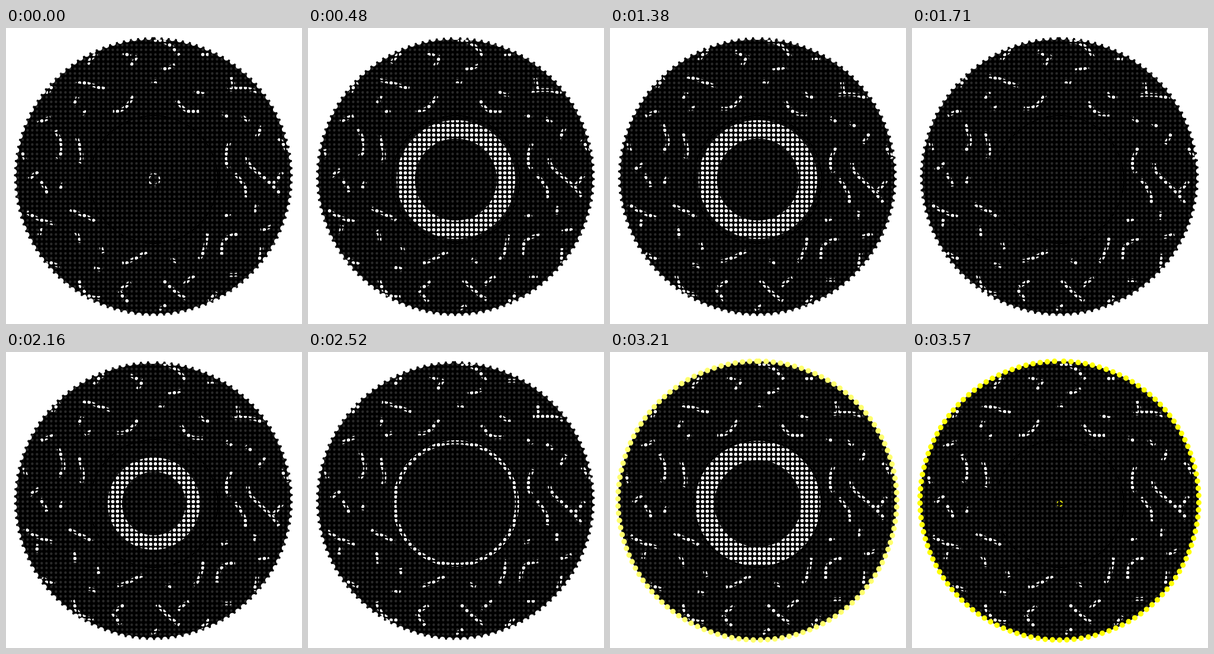
These frames come from a looping animation (500x500 px, 3600 ms). An HTML page with a canvas:

```html
<!DOCTYPE html>
<html lang="en">
<head>
<meta charset="utf-8">
<title>Halftone disc</title>
<style>
  html, body { margin: 0; width: 100%; height: 100%; overflow: hidden; background: #fff; }
  canvas { display: block; width: 500px; height: 500px; }
</style>
</head>
<body>
<canvas id="stage" width="500" height="500"></canvas>
<script>
const LOOP = 3600, SIZE = 500, TAU = Math.PI * 2;
const DISC = { x: 249, y: 251, r: 235.5 };
const HUB = { x: 249.7, y: 256, r: 108 };
const PULSE = 900, LEAD = 57;      // one ring every PULSE ms
const GAP = 12.2;                  // distance between rim beads

// Broken waves around the hub; trough is the angle of one inward bend.
const WAVES = [
  { r: 195, amp: 34, n: 7, trough: -1.94, dash: [52, 64, 20, 38] },
  { r: 205, amp: 24, n: 7, trough: -1.49, dash: [24, 46, 14, 58] },
  { r: 143, amp: 18, n: 7, trough: -1.08, dash: [46, 40, 12, 44] }
];

function surface() {
  const c = document.createElement('canvas');
  c.width = c.height = SIZE;
  return c.getContext('2d');
}

function disc(g, { x, y }, r) {
  g.moveTo(x + r, y);
  g.arc(x, y, r, 0, TAU);
}

function dotGrid(r, color) {
  const g = surface();
  g.fillStyle = color;
  g.beginPath();
  for (let y = 4.8; y < SIZE; y += 8)
    for (let x = 4.4; x < SIZE; x += 8) disc(g, { x, y }, r);
  g.fill();
  return g.canvas;
}

const ctx = document.getElementById('stage').getContext('2d');
const light = surface();
const mask = dotGrid(2.8, '#fff');
const base = surface();

base.beginPath();
disc(base, DISC, DISC.r);
base.fill();
base.globalCompositeOperation = 'source-atop';
base.drawImage(dotGrid(2.2, '#292929'), 0, 0);
base.lineWidth = 2;
base.beginPath();
disc(base, HUB, HUB.r);
base.stroke();

function wavePath({ r, amp, n, trough }, turn) {
  const path = new Path2D();
  for (let a = 0; a <= TAU; a += TAU / 360) {
    const d = r - amp * Math.cos(n * (a - trough));
    path.lineTo(DISC.x + d * Math.cos(a + turn), DISC.y + d * Math.sin(a + turn));
  }
  return path;
}

function drawWaves(t) {
  const turn = .035 * Math.cos(TAU * (t - 1700) / LOOP);
  light.strokeStyle = '#fff';
  light.lineWidth = 6;
  for (const wave of WAVES) {
    light.setLineDash(wave.dash);
    light.stroke(wavePath(wave, turn));
  }
  light.setLineDash([]);
}

function drawRing(t) {
  const age = (t + LEAD) % PULSE;
  light.save();
  light.beginPath();
  disc(light, HUB, HUB.r - 1);
  light.clip();
  light.strokeStyle = t >= LOOP - LEAD ? '#ff0' : '#fff';
  light.lineWidth = age * .0575;
  light.beginPath();
  disc(light, HUB, age * .1575);
  light.stroke();
  light.restore();
}

// Beads run clockwise from the top, so the only uneven gap is there.
function drawRim(t) {
  const tint = Math.max(0, (t - 2700) / 900);
  const length = TAU * DISC.r;
  const shift = (length / 2 + 4 * GAP * t / LOOP) % GAP;
  ctx.fillStyle = `rgb(255,255,${Math.round(255 * (1 - tint))})`;
  ctx.beginPath();
  for (let s = shift; s < length; s += GAP) {
    const a = s / DISC.r - TAU / 4;
    disc(ctx, { x: DISC.x + DISC.r * Math.cos(a), y: DISC.y + DISC.r * Math.sin(a) }, 4.6);
  }
  ctx.fill();
}

function draw(t) {
  light.clearRect(0, 0, SIZE, SIZE);
  drawWaves(t);
  drawRing(t);
  light.globalCompositeOperation = 'destination-in';
  light.drawImage(mask, 0, 0);
  light.globalCompositeOperation = 'source-over';

  ctx.fillStyle = '#fff';
  ctx.fillRect(0, 0, SIZE, SIZE);
  ctx.drawImage(base.canvas, 0, 0);
  ctx.drawImage(light.canvas, 0, 0);
  drawRim(t);
}

const start = performance.now();
function tick() {
  draw((performance.now() - start) % LOOP);
  requestAnimationFrame(tick);
}
tick();
</script>
</body>
</html>
```
